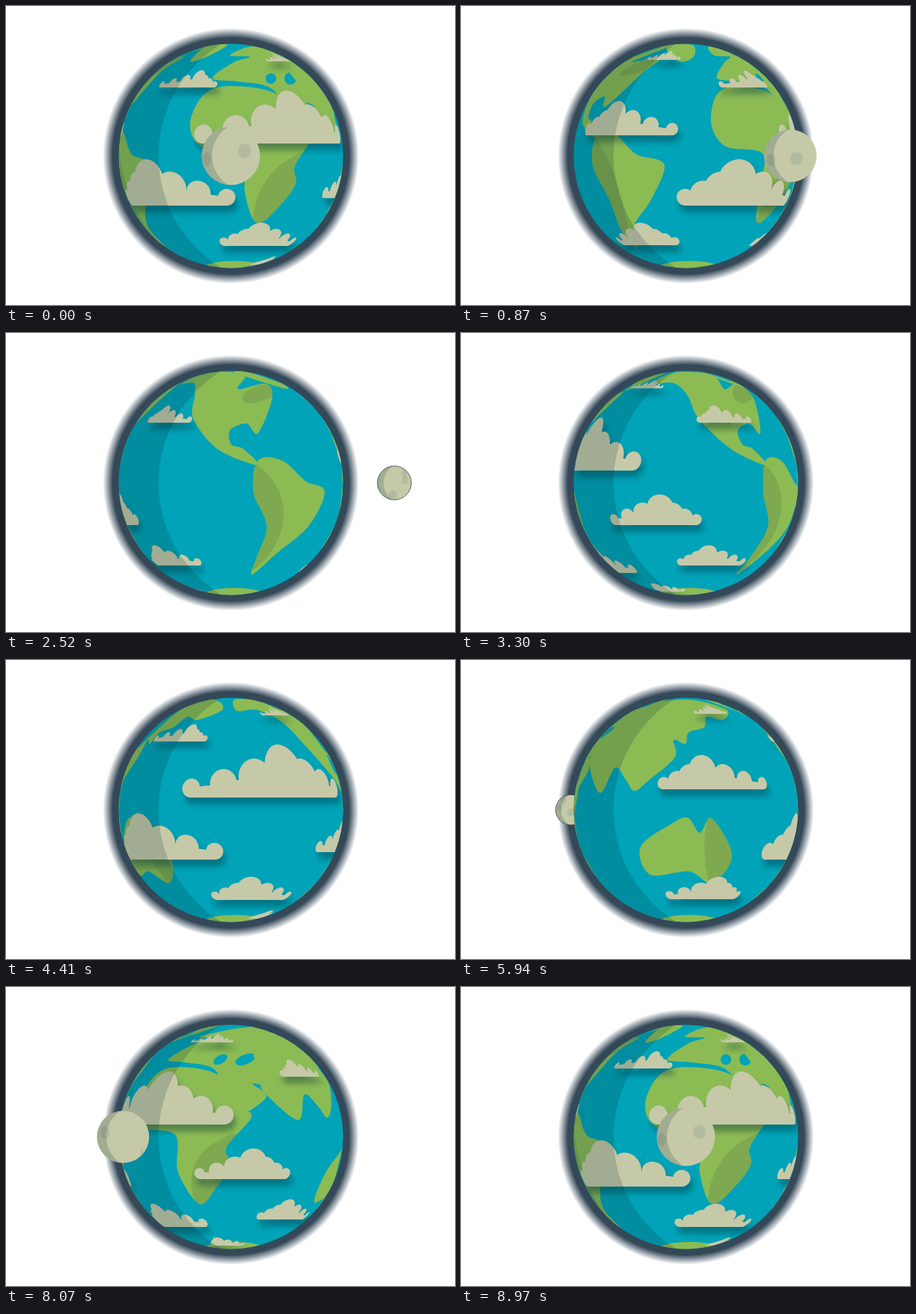
Write an HTML page with a canvas that moves like this. It is 600x400 px and loops after 9000 ms.

```html
<!DOCTYPE html>
<html>
<head>
<meta charset="utf-8">
<style>
html, body { margin: 0; width: 100%; height: 100%; overflow: hidden; background: #fff; }
canvas { display: block; }
</style>
</head>
<body>
<canvas id="stage" width="600" height="400"></canvas>
<script>
const ctx = document.getElementById('stage').getContext('2d');
const CX = 300.5, CY = 200.5, R = 150, SPAN = 8970, TAU = Math.PI * 2, RAD = Math.PI / 180;
const RING = '#344858', SEA = '#00a3b8', LAND = '#8cbb54', DARK_LAND = '#7ea950', CLOUD = '#c6c9a8';
// Degrees in one full turn of each layer, and how long the turn takes
const GROUND = { turn: 370, period: SPAN };
const SKY = { turn: 399, period: SPAN / 2 };

const clamp = (v, lim) => Math.max(-lim, Math.min(lim, v));
const row = y => Math.sqrt(Math.max(1, R * R - (y - CY) ** 2));
const longitude = (x, y) => Math.asin(clamp((x - CX) / row(y), 1)) / RAD;
const project = (lon, y) => [CX + row(y) * Math.sin(clamp(lon, 90) * RAD), y];
const circle = (x, y, r) => Array.from({ length: 48 }, (_, i) =>
  [x + r * Math.cos(i * TAU / 48), y + r * Math.sin(i * TAU / 48)]);

function spin({ turn, period }, lon, t) {
  const at = lon + turn * t / period;
  return at - turn * Math.round(at / turn);
}

// Coast key points are placed as they look at time `seen`; spots are x, y, radius, colour.
const lands = [
  { // North America
    seen: 3300,
    coast: [256,68, 285,53, 335,56, 352,75, 368,68, 391,88, 400,134, 385,121,
      370,130, 376,149, 390,155, 408,177, 362,156, 318,115, 303,84, 284,67],
    spots: [[377, 80, 14, DARK_LAND]]
  },
  { // Greenland
    seen: 0,
    coast: [246,74, 268,54, 296,52, 268,68]
  },
  { // South America
    seen: 1740,
    coast: [256,170, 290,171, 325,198, 363,212, 340,258, 300,294, 281,323, 273,300, 272,258, 248,212],
    spots: [[190, 260, 105, DARK_LAND]]
  },
  { // Africa
    seen: 0,
    coast: [246,158, 264,119, 300,107, 362,118, 385,158, 410,172, 386,214,
      387,238, 364,269, 335,290, 319,248, 320,198, 262,188],
    spots: [[430, 290, 100, DARK_LAND]]
  },
  { // Europe and Arabia
    seen: 0,
    coast: [276,97, 303,76, 326,68, 299,66, 335,54, 375,72, 410,105, 436,143,
      402,129, 418,148, 388,176, 370,130, 350,108, 310,101],
    spots: [[354, 97, 7, SEA], [380, 97, 8, SEA]]
  },
  { // Asia
    seen: 5940,
    coast: [186,178, 206,144, 220,160, 232,175, 252,160, 286,130, 284,107, 300,112, 304,97,
      325,90, 328,76, 350,80, 354,66, 300,53, 240,66, 180,122, 172,142]
  },
  { // Australia
    seen: 5940,
    coast: [240,250, 280,220, 303,211, 319,231, 335,212, 362,262, 335,298, 305,283, 253,287],
    spots: [[525, 250, 200, DARK_LAND]]
  }
];
for (const land of lands) {
  const flat = land.coast;
  land.coast = flat.flatMap((x, i) => i % 2 ? [] : [[x, flat[i + 1]]]);
  land.mid = land.coast.reduce((sum, p) => sum + longitude(...p), 0) / land.coast.length;
}

// Centre longitude, base line, width in degrees, height, place of the peak along the width
const clouds = [
  [31, 184, 101, 71, .57], [-40, 267, 85, 62, .38], [26, 321, 70, 31, .4], [-114, 320, 63, 30, .61],
  [126, 311, 54, 27, .37], [-113, 173, 63, 46, .37], [87, 257, 54, 41, .6], [-32, 109, 46, 23, .7],
  [131, 120, 38, 23, .33], [-102, 72, 38, 12, .58], [60, 74, 45, 11, .6], [74, 346, 60, 11, .3]
];

// Longitude and height on the moon
const craters = [[28, -.17], [-56, .1], [-117, .16], [-155, -.59], [197, -.16], [150, .68]];

function disc(x, y, r, fill) {
  ctx.beginPath();
  ctx.arc(x, y, r, 0, TAU);
  ctx.fillStyle = fill;
  ctx.fill();
}

function polygon(pts) {
  pts.forEach((p, i) => i ? ctx.lineTo(...p) : ctx.moveTo(...p));
  ctx.closePath();
}

// Closed Catmull-Rom curve through the points
function spline(pts) {
  const at = i => pts[(i + pts.length) % pts.length];
  const handle = (i, sign) => at(i).map((v, k) => v + sign * (at(i + 1)[k] - at(i - 1)[k]) / 6);
  ctx.moveTo(...pts[0]);
  pts.forEach((_, i) => ctx.bezierCurveTo(...handle(i, 1), ...handle(i + 1, -1), ...at(i + 1)));
}

// Night side: the ball minus a larger, offset circle
function night(x, y, r) {
  ctx.save();
  ctx.beginPath();
  ctx.rect(x - r - 1, y - r - 1, 2 * r + 2, 2 * r + 2);
  ctx.arc(x + r * .525, y, r * 1.17, 0, TAU, true);
  ctx.clip('evenodd');
  disc(x, y, r, 'rgba(0,42,48,.18)');
  ctx.restore();
}

function drawLand({ seen, coast, mid, spots = [] }, t) {
  const shift = spin(GROUND, mid, t - seen) - mid;
  const place = ([x, y]) => project(longitude(x, y) + shift, y);
  ctx.save();
  ctx.beginPath();
  spline(coast.map(place));
  ctx.fillStyle = LAND;
  ctx.fill();
  ctx.clip();
  for (const [x, y, r, color] of spots) {
    ctx.beginPath();
    polygon(circle(x, y, r).map(place));
    ctx.fillStyle = color;
    ctx.fill();
  }
  ctx.restore();
}

// Seven lobes shrink from the peak towards both ends, on a body with a flat base.
function drawCloud([lon, base, width, height, peak], t) {
  const centre = spin(SKY, lon, t), px = row(base) * RAD, inset = height * .18;
  const place = ([x, y]) => project(centre + x / px, Math.min(y, base));
  const left = -width * px / 2 + inset, length = width * px - 2 * inset;
  const body = [];
  ctx.beginPath();
  for (let k = -3; k <= 3; k++) {
    const far = Math.abs(k) / 3;
    const u = peak + far * ((k < 0 ? 0 : 1) - peak);
    const r = height * (.42 - .24 * far);
    const x = left + length * u, y = base - height * (1 - .64 * far ** .8) + r;
    polygon(circle(x, y, r).map(place));
    body.push([x, y]);
  }
  polygon([...body, ...body.map(([x]) => [x, base]).reverse()].map(place));
  ctx.save();
  ctx.shadowColor = 'rgba(0,45,55,.4)';
  ctx.shadowBlur = 8;
  ctx.shadowOffsetX = 3;
  ctx.shadowOffsetY = 9;
  ctx.fillStyle = CLOUD;
  ctx.fill();
  ctx.restore();
}

function drawEarth(t) {
  ctx.save();
  disc(CX, CY, R, SEA);
  ctx.clip();
  lands.forEach(land => drawLand(land, t));
  ctx.beginPath();
  ctx.ellipse(305, 350, 40, 9, 0, 0, TAU);
  ctx.fillStyle = LAND;
  ctx.fill();
  clouds.forEach(cloud => drawCloud(cloud, t));
  ctx.restore();
  night(CX, CY, R);
}

function moonAt(t) {
  const a = t / SPAN * TAU, s = Math.sin(a), front = Math.cos(a) >= 0;
  const toCentre = Math.abs(a - Math.PI) / (Math.PI / 2);
  const reach = front ? Math.abs(s) ** 1.08 : toCentre ** 1.17;
  return { x: CX + 255 * Math.sign(s) * reach, r: 64.6 / (2.657 - Math.cos(a)), front };
}

function drawMoon({ x, r }, t) {
  ctx.save();
  disc(x, CY, r, CLOUD);
  if (Math.abs(x - CX) > R - 5) {
    ctx.strokeStyle = RING;
    ctx.lineWidth = .8;
    ctx.stroke();
  }
  ctx.clip();
  ctx.fillStyle = 'rgba(90,125,115,.18)';
  for (const [lon, y] of craters) {
    const a = (lon + 720 * t / SPAN) * RAD, size = r * .25;
    if (Math.cos(a) <= 0) continue;
    ctx.beginPath();
    ctx.ellipse(x + r * Math.sin(a) * Math.sqrt(1 - y * y), CY + y * r, size * Math.cos(a), size, 0, 0, TAU);
    ctx.fill();
  }
  ctx.restore();
  night(x, CY, r);
}

const glow = ctx.createRadialGradient(CX, CY, 158, CX, CY, 171);
glow.addColorStop(0, RING);
glow.addColorStop(1, 'rgba(52,72,88,0)');

function draw(now) {
  const t = Math.floor(now % 9000 / 30) * 30;
  const moon = moonAt(t);
  ctx.clearRect(0, 0, 600, 400);
  disc(CX, CY, 172, glow);
  if (!moon.front) drawMoon(moon, t);
  drawEarth(t);
  if (moon.front) drawMoon(moon, t);
}

const start = performance.now();
function loop() {
  draw(performance.now() - start);
  requestAnimationFrame(loop);
}
loop();
</script>
</body>
</html>
```
